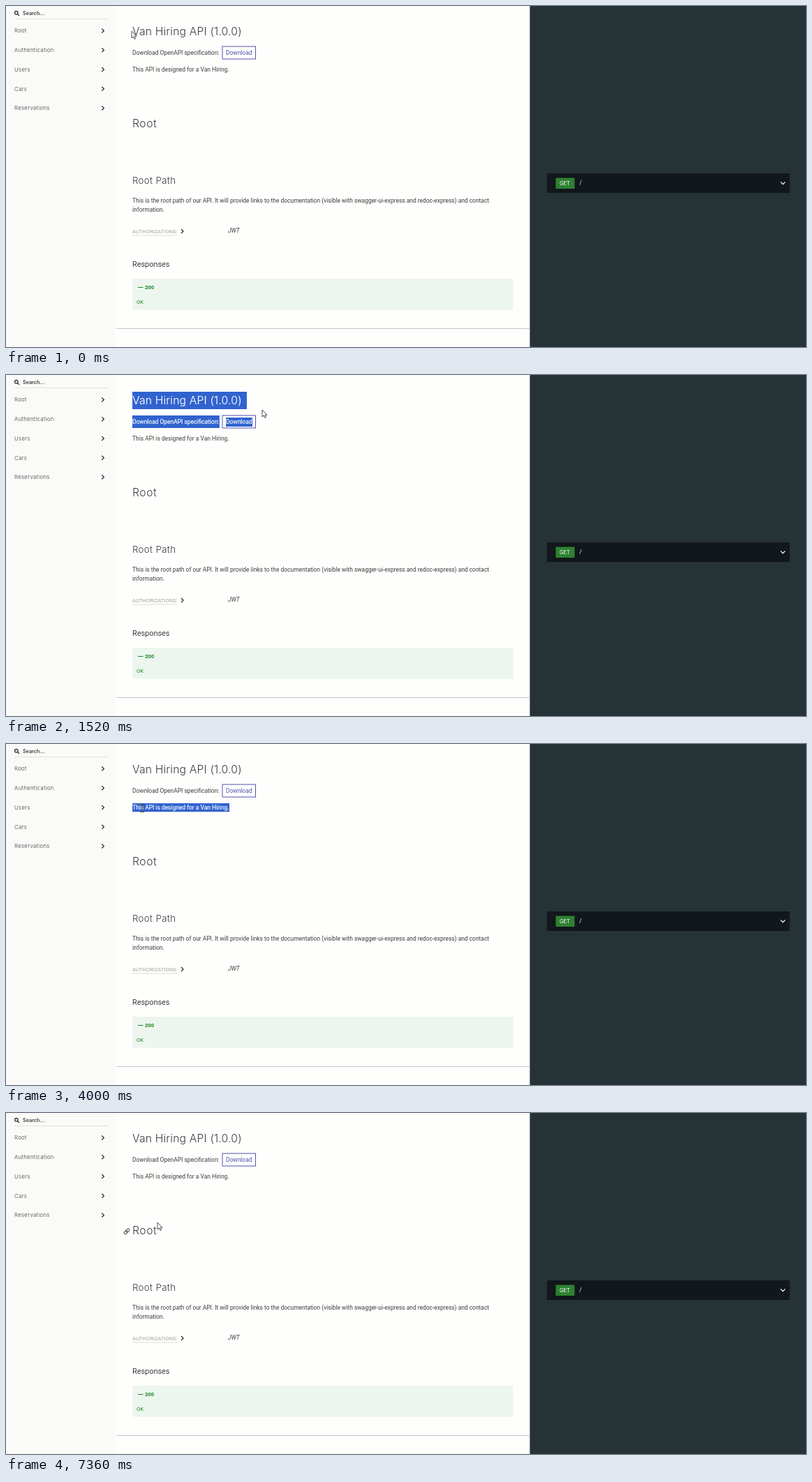
An HTML page for the animation above (8 s loop, 1146x489 px).

```html
<!DOCTYPE html>
<html lang="en">
<head>
<meta charset="utf-8">
<title>API reference</title>
<style>
  html, body { margin: 0; width: 100%; height: 100%; overflow: hidden; background: #fefefc; }
  svg { display: block; width: 100%; height: 100%; }
  text { font-family: Roboto, "Liberation Sans", sans-serif; font-size: 8.43px; fill: #3c3c3c; white-space: pre; }
  .head { font-family: Inter, "Open Sans", sans-serif; font-weight: 300; }
  .h1 { font-size: 15.65px; letter-spacing: .2px; }
  .h2 { font-size: 13.2px; letter-spacing: .4px; }
  .menu { font-size: 7.85px; letter-spacing: .3px; }
  .small { font-size: 7.6px; }
  .green { fill: #1d8127; }
  .line { fill: none; stroke: #333; stroke-width: 1.3; }
  .sel rect { fill: #3163cf; }
  .sel text { fill: #fff; stroke: #fff; stroke-width: .15; }
</style>
</head>
<body>
<svg viewBox="0 0 1146 489" preserveAspectRatio="none">
  <rect width="1146" height="489" fill="#fefefc"/>
  <rect width="157" height="489" fill="#fafaf8"/>
  <rect x="750.4" width="395.6" height="489" fill="#253236"/>

  <g id="menu">
    <circle cx="14.8" cy="9.8" r="2.3" class="line"/>
    <path d="M16.5 11.5L19 14" class="line"/>
    <text x="24" y="13.1" class="head" style="font-size:7.2px;font-weight:600">Search...</text>
    <path d="M12 18.5H145" stroke="#e1e1e1"/>
  </g>

  <text id="title" x="181" y="41.6" class="head h1">Van Hiring API (1.0.0)</text>
  <text id="spec" x="181" y="70">Download OpenAPI specification:</text>
  <rect x="310" y="58" width="47.5" height="18" fill="none" stroke="#5553b0"/>
  <text id="button" x="315" y="70" style="fill:#5553b0">Download</text>
  <text id="about" x="181" y="94">This API is designed for a Van Hiring.</text>

  <text x="181" y="173.7" class="head h1" style="letter-spacing:.6px">Root</text>
  <text x="181" y="255" class="head h2">Root Path</text>
  <text x="181" y="282">This is the root path of our API. It will provide links to the documentation (visible with swagger-ui-express and redoc-express) and contact</text>
  <text x="181" y="294.5">information.</text>

  <text x="181" y="325.6" class="small" style="fill:#a2a2a2">AUTHORIZATIONS:</text>
  <path d="M181 329H246" stroke="#b5b5b5" stroke-width=".8" stroke-dasharray="1.5 1"/>
  <path d="M251 320L254 323L251 326" class="line"/>
  <text x="318" y="325.4" font-style="italic">JWT</text>

  <text x="181" y="374" style="font-size:10.9px">Responses</text>
  <rect x="181" y="391" width="545.5" height="44.6" fill="#edf6ee"/>
  <path d="M189 403.5H196.5" stroke="#1d8127"/>
  <text x="199" y="406.2" class="small green" font-weight="700">200</text>
  <text x="187" y="427.2" class="small green">OK</text>
  <path d="M158 462.5H750.4" stroke="#c4c4c4"/>

  <rect x="775" y="240" width="347.5" height="28" fill="#11171a"/>
  <rect x="787.5" y="246.5" width="27" height="15.5" fill="#2f8132"/>
  <text x="793" y="256.9" class="head" style="font-size:7.5px;font-weight:400;fill:#fff">GET</text>
  <text x="821.3" y="257" style="fill:#fff">/</text>
  <path d="M1109.7 252.4L1112.9 255.6L1116.1 252.4" class="line" style="stroke:#fff"/>

  <g id="marks"></g>

  <g id="link" transform="translate(173 169.8) rotate(-45)" class="line" style="stroke:#55554a;stroke-width:1.1">
    <rect x="-4.8" y="-1.8" width="5.6" height="3.6" rx="1.8"/>
    <rect x="-.8" y="-1.8" width="5.6" height="3.6" rx="1.8"/>
  </g>

  <g id="cursor">
    <path id="arrow" d="M0 0V10L2.3 7.9L4 11.5L5.6 10.8L4 7.3H7Z" fill="#fff" stroke="#3c3c48" stroke-width=".9"/>
    <path id="beam" d="M-3 -5.5H-1L0 -5L1 -5.5H3M0 -5V5M-3 5.5H-1L0 5L1 5.5H3" fill="none" stroke="#444" stroke-width=".9"/>
  </g>
</svg>
<script>
const LOOP = 8000, STEP = 40;
const NS = "http://www.w3.org/2000/svg";
const $ = id => document.getElementById(id);

function add(parent, tag, attrs, text) {
  const el = document.createElementNS(NS, tag);
  for (const k in attrs) el.setAttribute(k, attrs[k]);
  if (text) el.textContent = text;
  parent.append(el);
  return el;
}

["Root", "Authentication", "Users", "Cars", "Reservations"].forEach((label, i) => {
  const y = 35.5 + i * 27.75;
  add($("menu"), "text", { x: 12, y: y + 2.9, class: "head menu" }, label);
  add($("menu"), "path", { d: `M137.3 ${y - 3}l3 3l-3 3`, class: "line" });
});

// White-on-blue copy of a text, revealed from the left by a clip of given width
function mark(id, top, height) {
  const src = $(id), x = +src.getAttribute("x");
  const clip = add($("marks"), "clipPath", { id: id + "Clip" });
  const box = { x, y: top, width: 0, height };
  const win = add(clip, "rect", box);
  const g = add($("marks"), "g", { class: "sel", "clip-path": `url(#${id}Clip)` });
  add(g, "rect", { ...box, width: 400 });
  const copy = src.cloneNode(true);
  copy.removeAttribute("id");
  copy.removeAttribute("style");
  g.append(copy);
  return width => {
    win.setAttribute("width", width);
    src.style.visibility = width >= src.getComputedTextLength() ? "hidden" : "";
  };
}
const marks = {
  title: mark("title", 24, 25),
  spec: mark("spec", 58, 18),
  button: mark("button", 61, 13),
  about: mark("about", 85, 12.5)
};

// time, x, y
const path = [
  [0, 180, 36], [80, 180, 36], [160, 181, 40], [360, 181, 41], [1080, 281, 43],
  [1160, 290, 43], [1200, 290, 43], [1440, 354, 47], [1520, 367, 50], [1600, 369, 50],
  [1800, 369, 50], [2600, 388, 40], [2640, 388, 40], [2920, 391, 36], [3000, 391, 36],
  [3320, 198, 98], [3440, 195, 92], [4400, 195, 92], [4600, 201, 125], [6800, 201, 125],
  [7080, 206, 204], [7160, 207, 204], [7360, 217, 157], [8000, 217, 157]
];
// time, selected letters of the title
const letters = [[0, 0], [400, 0], [1080, 11], [1160, 12], [1200, 12], [1400, 22], [8000, 22]];

function at(keys, t) {
  const i = Math.max(1, keys.findIndex(k => k[0] > t));
  const a = keys[i - 1], b = keys[i];
  const p = (t - a[0]) / (b[0] - a[0]);
  return a.slice(1).map((v, j) => v + (b[j + 1] - v) * p);
}
const within = (t, from, to) => t >= from && t < to;
const show = (el, on) => el.style.display = on ? "" : "none";
const fullWidth = id => $(id).getComputedTextLength() + .5;

function draw(now) {
  const t = Math.floor(now % LOOP / STEP) * STEP;
  const [x, y] = at(path, t);
  $("cursor").setAttribute("transform", `translate(${x} ${y})`);

  const overRoot = y >= 155 && y < 183;
  const beam = within(t, 360, 1400) || within(t, 3400, 4480) || (overRoot && x < 216);
  show($("beam"), beam);
  show($("arrow"), !beam);
  show($("link"), overRoot);

  const n = t < 3000 ? Math.floor(at(letters, t)[0] + .001) : 0;
  marks.title(n > 21 ? 164 : n ? $("title").getSubStringLength(0, n) : 0);
  const rest = within(t, 1440, 3000);
  marks.spec(rest ? fullWidth("spec") : 0);
  marks.button(rest ? fullWidth("button") : 0);
  marks.about(within(t, 3960, 6400) ? fullWidth("about") : 0);
}

const start = performance.now();
function tick() {
  draw(performance.now() - start);
  requestAnimationFrame(tick);
}
tick();
</script>
</body>
</html>
```
